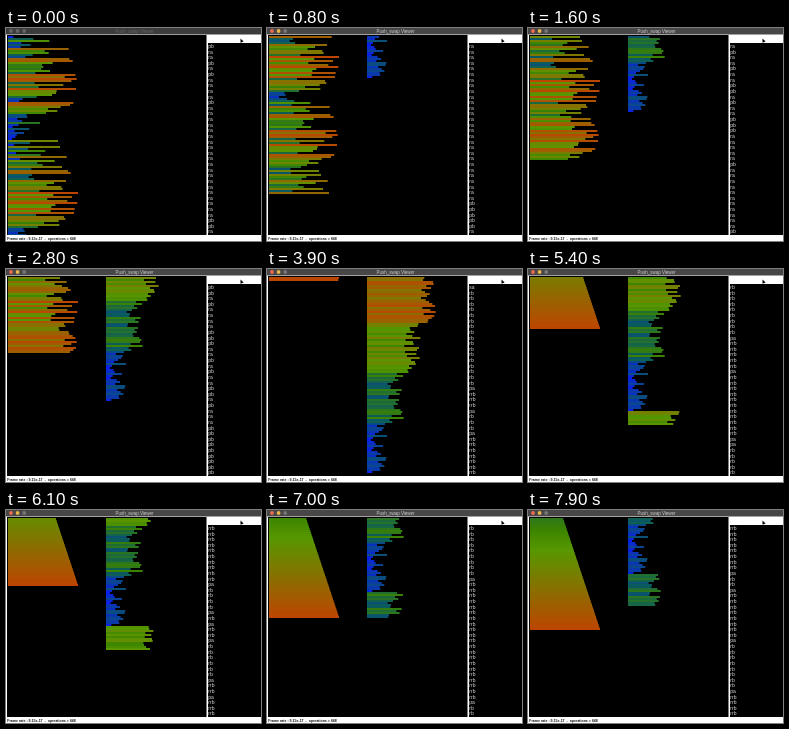
These frames come from a looping animation (255 by 213 pixels, 8 s). An HTML page with a canvas:

```html
<!DOCTYPE html>
<html>
<head>
<meta charset="utf-8">
<style>
html, body { margin: 0; width: 100%; height: 100%; overflow: hidden; background: #000; }
canvas { display: block; }
</style>
</head>
<body>
<canvas id="stage" width="255" height="213"></canvas>
<script>
const ctx = document.getElementById('stage').getContext('2d');
const N = 100, LOOP = 8000, STEP = 100;

let seed = 42;
function random() {
  seed = (seed * 16807) % 2147483647;
  return seed / 2147483647;
}

// Shuffled values 0..N-1, with large ones gathered around two places.
const start = [];
Array.from({ length: N }, (_, i) => [random() + 0.3 * Math.cos((i - 21) * Math.PI / 28), i])
  .sort((p, q) => p[0] - q[0])
  .forEach(([, i], rank) => { start[i] = rank; });

const moves = {
  pa: (a, b) => a.unshift(b.shift()),
  pb: (a, b) => b.unshift(a.shift()),
  sa: a => a.unshift(...a.splice(0, 2).reverse()),
  ra: a => a.push(a.shift()),
  rb: (a, b) => b.push(b.shift()),
  rrb: (a, b) => b.unshift(b.pop())
};

// Sort: push quarters to B, then bring back the largest each time.
const ops = [], states = [];
function solve() {
  const a = [...start], b = [];
  const save = () => states.push([[...a], [...b]]);
  const run = op => { moves[op](a, b); ops.push(op); save(); };
  save();
  for (const limit of [25, 50, 75, 98])
    while (a.some(v => v < limit)) run(a[0] < limit ? 'pb' : 'ra');
  if (a[0] > a[1]) run('sa');
  while (b.length) {
    const max = Math.max(...b);
    const turn = b.indexOf(max) <= b.length / 2 ? 'rb' : 'rrb';
    while (b[0] !== max) run(turn);
    run('pa');
  }
}
solve();

// Key points: time and size of B, which grows until full and then shrinks.
const full = states.findIndex(s => s[1].length === 98);
const marks = [[0, 0], [1600, 38], [2800, 62], [3900, 98], [4700, 86], [6100, 66], [7900, 44]]
  .map(([t, size]) =>
    [t, states.findIndex((s, i) => s[1].length === size && (t <= 3900 || i > full))]);

function opAt(t) {
  let k = 1;
  while (k < marks.length - 1 && t > marks[k][0]) k++;
  const [t0, i0] = marks[k - 1], [t1, i1] = marks[k];
  return Math.round(i0 + (i1 - i0) * (t - t0) / (t1 - t0));
}

function rect(color, x, y, w, h) {
  ctx.fillStyle = color;
  ctx.fillRect(x, y, w, h);
}

function text(str, x, y, size, color, align = 'left', weight = 'normal') {
  ctx.font = `${weight} ${size}px "Liberation Sans", Arial, sans-serif`;
  ctx.textAlign = align;
  ctx.fillStyle = color;
  ctx.fillText(str, x, y);
}

function barColor(v) {
  const r = 10 + 255 * Math.max(0, v - 0.3);
  const g = 30 + 204 * v - 408 * Math.max(0, v - 0.6);
  const b = Math.max(0, 235 - 470 * v);
  return `rgb(${r | 0},${g | 0},${b | 0})`;
}

function drawStack(stack, x) {
  stack.forEach((n, i) => {
    const v = n / (N - 1);
    rect(barColor(v), x, 8 + 2 * i, 4 + 66 * v, 2);
  });
}

function drawTitle(active) {
  rect(active ? '#484646' : '#3c3c3c', 0, 0, 255, 6.5);
  const lights = active ? ['#ee6a50', '#e8b548', '#777'] : ['#666', '#666', '#666'];
  lights.forEach((color, i) => {
    ctx.fillStyle = color;
    ctx.beginPath();
    ctx.arc(5 + 6.6 * i, 3, 1.9, 0, 7);
    ctx.fill();
  });
  text('Push_swap Viewer', 128.5, 4.7, 4.5, active ? '#ccc' : '#666', 'center');
}

function drawCursor() {
  ctx.fillStyle = '#000';
  ctx.beginPath();
  ctx.moveTo(234.5, 10.5);
  ctx.lineTo(234.5, 14.7);
  ctx.lineTo(237.6, 13.4);
  ctx.fill();
}

function draw(t) {
  const at = opAt(t), [a, b] = states[at];
  rect('#fff', 0, 0, 255, 213);
  rect('#000', 1, 7, 199.5, 200);
  rect('#000', 202, 15, 53, 192);
  drawTitle(t > 0);
  drawStack(a, 2);
  drawStack(b, 100);
  ops.slice(at, at + 34).forEach((op, i) => text(op, 202.3, 20 + 5.62 * i, 5, '#ddd'));
  rect('#fff', 0, 207, 255, 6);
  text('Frame rate : 9.15e-17  -  operations = 648', 1.3, 211.5, 3.55, '#111', 'left', 'bold');
  drawCursor();
}

function tick(now) {
  draw(Math.floor(now % LOOP / STEP) * STEP);
  requestAnimationFrame(tick);
}
draw(0);
requestAnimationFrame(tick);
</script>
</body>
</html>
```
